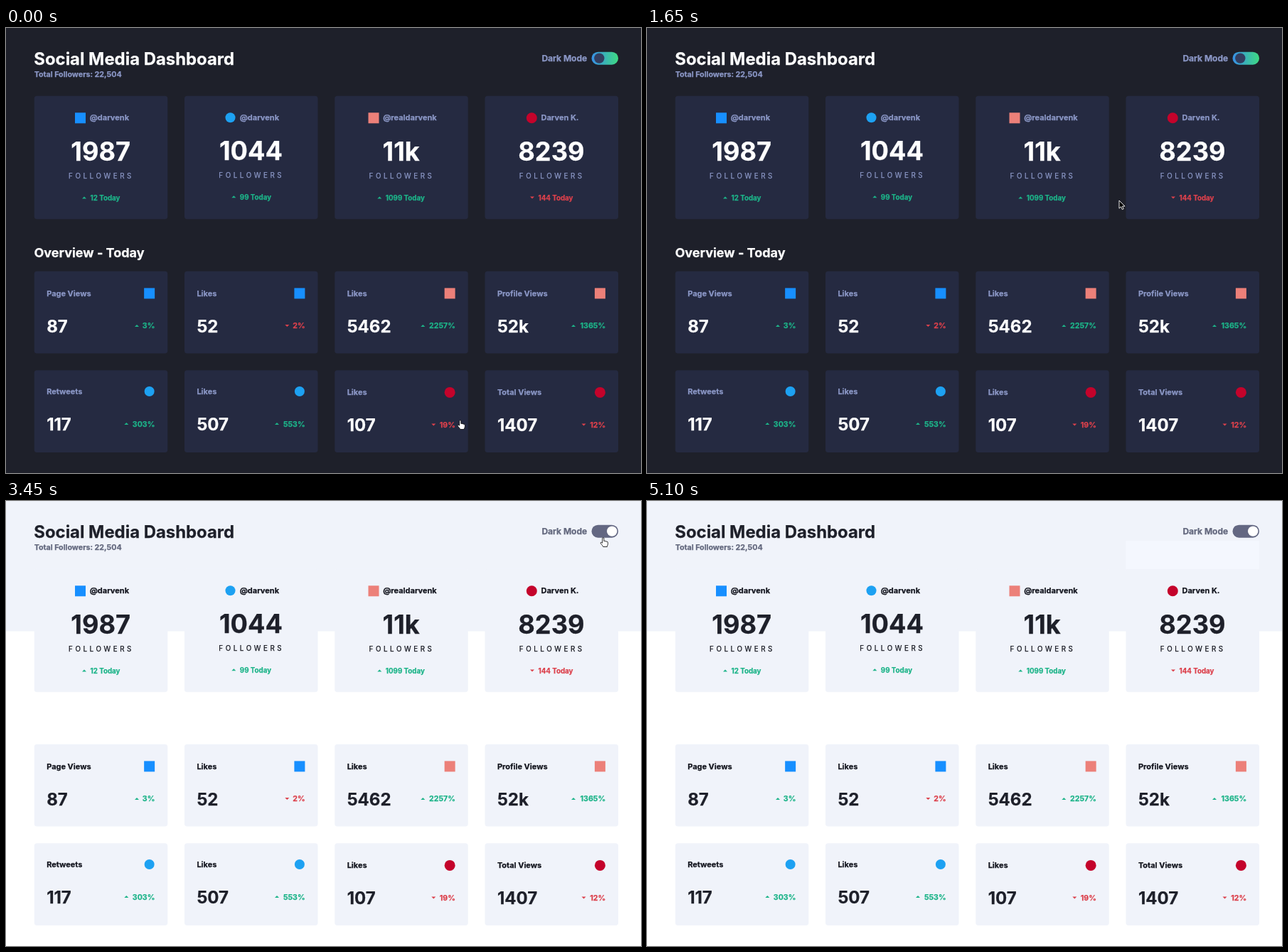
Write an HTML page that moves like this. It is 893 by 627 pixels and loops after 7.04 s.

```html
<!DOCTYPE html>
<html lang="en">
<head>
<meta charset="utf-8">
<title>Social Media Dashboard</title>
<style>
  html, body { margin: 0; width: 100%; height: 100%; overflow: hidden; }
  svg {
    --bg: #1e202a; --band: #1e202a; --card: #252a41; --ink: #fff;
    --muted: #8b97c6; --label: #8b97c6; --track: url(#track); --knob: #333d5f;
    display: block; width: 893px; height: 627px; background: var(--bg);
    font: 700 11px Inter, sans-serif; font-optical-sizing: none;
  }
  svg.light {
    --bg: #fff; --band: #f0f3fa; --card: #f0f3fa; --ink: #1e202a;
    --muted: #63687e; --label: #14161f; --track: #636782; --knob: #fff;
  }
  /* A hairline stroke gives the slightly heavier smoothed lettering. */
  text { fill: currentColor; stroke: currentColor; stroke-width: .25px; }
  .band { fill: var(--band); }
  .card { fill: var(--card); }
  .ink { color: var(--ink); }
  .muted { color: var(--muted); }
  .label { color: var(--label); }
  .up { color: #1db489; }
  .down { color: #dc414c; }
  .title { font-size: 23.9px; }
  .count { font-size: 24px; }
  .heading { font-size: 18px; color: #fff; }
  .total { font-size: 10.7px; }
  .mode { font-size: 12px; }
  .big { font-size: 36.2px; text-anchor: middle; }
  .caption { font-size: 9.75px; font-weight: 400; letter-spacing: 3.6px; }
  .today { font-size: 9.75px; }
  .percent { font-size: 10.6px; text-anchor: end; }
</style>
</head>
<body>
<svg id="stage" viewBox="0 0 893 627">
  <defs>
    <linearGradient id="track">
      <stop stop-color="#378fe6"/><stop offset="1" stop-color="#3eda82"/>
    </linearGradient>
  </defs>
  <rect class="band" width="893" height="183.5"/>
  <rect id="patch" x="673.5" y="56" width="187.5" height="40" fill="#f4f7fe"/>
  <text class="title ink" x="39.3" y="52">Social Media Dashboard</text>
  <text class="total muted" x="39.7" y="68.6">Total Followers: 22,504</text>
  <text class="mode muted" x="753.4" y="47">Dark Mode</text>
  <rect x="823.5" y="33.7" width="37.5" height="18" rx="9" style="fill:var(--track)"/>
  <circle id="knob" cy="42.6" r="7.2" style="fill:var(--knob)"/>
  <text class="heading" x="39.5" y="323">Overview - Today</text>
  <g id="cards"></g>
  <g id="cursor">
    <path id="arrow" d="M0 0V11.2l2.6-2.4 1.7 3.9 1.9-.8-1.7-3.8h3.5Z" fill="#000" stroke="#fff" stroke-width=".9"/>
    <path id="hand" d="M-1.3 7V.8a1.1 1.1 0 0 1 2.2 0V4.5q1.2-.8 2 .3q1.2-.5 1.9.5q1.6-.3 1.6 1.2V8.5q0 1.5-1 2.8V12.5H-.2Q-1 10.5-3.3 8.3q-1.4-1.6-.2-2q1-.3 2.2.9Z" fill="#fff" stroke="#000" stroke-width=".8"/>
  </g>
</svg>
<script>
const LOOP = 7040, STEP = 150;
const $ = id => document.getElementById(id);
const columnX = column => 39.75 + 211.25 * column;
const cards = [];

const text = (cls, x, y, value) => `<text class="${cls}" x="${x}" y="${y}">${value}</text>`;

const badges = {
  blue: (x, y) => `<rect x="${x - 7.5}" y="${y - 7.5}" width="15" height="15" fill="#178fff"/>`,
  sky: (x, y) => `<circle cx="${x}" cy="${y}" r="7" fill="#1da1f2"/>`,
  coral: (x, y) => `<rect x="${x - 7.5}" y="${y - 7.5}" width="15" height="15" fill="#ec8079"/>`,
  red: (x, y) => `<circle cx="${x}" cy="${y}" r="7.5" fill="#c4032b"/>`
};

function trendArrow(trend, x, y) {
  const flip = trend === "up" ? 1 : -1;
  return `<path class="${trend}" fill="currentColor" d="M${x - 3} ${y + 1.5 * flip}h6l-3 ${-3 * flip}z"/>`;
}

function addCard(column, y, height, content) {
  const x = columnX(column);
  const node = document.createElementNS("http://www.w3.org/2000/svg", "g");
  node.innerHTML = `<rect class="card" x="${x}" y="${y}" width="187.5" height="${height}" rx="3.75"/>` + content;
  $("cards").append(node);
  cards.push({ node, x, y, height });
}

// badge, badge x, handle, followers, trend, arrow x, change today
[
  ["blue", 104.5, "@darvenk", "1987", "up", 110, "12"],
  ["sky", 315.5, "@darvenk", "1044", "up", 320.3, "99"],
  ["coral", 517, "@realdarvenk", "11k", "up", 525.3, "1099"],
  ["red", 739.3, "Darven K.", "8239", "down", 740, "144"]
].forEach(([badge, badgeX, handle, count, trend, arrowX, change], column) => {
  const lift = column === 1 ? 1.2 : 0;
  const x = columnX(column);
  addCard(column, 95.7, 173.6,
    badges[badge](badgeX, 126.8 - lift / 2) +
    text("label", badgeX + 13.2, 130.3 - lift / 2, handle) +
    text("big ink", x + 93.4, 187 - lift, count) +
    text("caption label", x + 48.3, 212.3 - lift, "FOLLOWERS") +
    trendArrow(trend, arrowX, 239 - lift) +
    text("today " + trend, arrowX + 8.5, 242.8 - lift, change + " Today"));
});

// label, badge, count, trend, arrow x, percent
[
  ["Page Views", "blue", "87", "up", 184, "3%"],
  ["Likes", "blue", "52", "down", 395.3, "2%"],
  ["Likes", "coral", "5462", "up", 586.3, "2257%"],
  ["Profile Views", "coral", "52k", "up", 798, "1365%"],
  ["Retweets", "sky", "117", "up", 169.3, "303%"],
  ["Likes", "sky", "507", "up", 381, "553%"],
  ["Likes", "red", "107", "down", 601.3, "19%"],
  ["Total Views", "red", "1407", "down", 812.5, "12%"]
].forEach(([label, badge, count, trend, arrowX, percent], i) => {
  const column = i % 4, x = columnX(column);
  const y = i < 4 ? 342.8 : 482.3;
  const shift = badge === "sky" ? -1.4 : 0;
  addCard(column, y, 115.6,
    badges[badge](x + 161.9, y + 31.1 + shift) +
    text("label", x + 17.4, y + 34.8 + shift / 2, label) +
    text("count ink", x + 17.4, y + 85.9 + shift, count) +
    trendArrow(trend, arrowX, y + 76.7 + shift) +
    text("percent " + trend, x + 169.7, y + 80.6 + shift, percent));
});

// Pointer tip, one position per step; it rests on the switch for a while.
const onSwitch = [841, 47.3];
const track = [
  [639, 553], [620, 552], [545, 547], [434, 539], [407, 534], [394, 510], [400, 454], [425, 415],
  [455, 380], [530, 345], [610, 300], [664, 243], [715, 190], [770, 130], [825, 58],
  ...Array(8).fill(onSwitch),
  [840, 52], [832, 66], [780, 115], [645, 165], [611, 202], [596, 255],
  [592, 312], [635, 346], [700, 390], [745, 436], [775, 475]
];

const cardAt = point => point && cards.find(c =>
  point[0] > c.x && point[0] < c.x + 187.5 && point[1] > c.y && point[1] < c.y + c.height);
const hoveredAt = step => step > 0 ? cardAt(track[step]) : undefined;
const overSwitch = ([x, y]) => x > 823 && y < 53;

function render() {
  const step = Math.floor(performance.now() % LOOP / STEP);
  const light = step >= 17;
  $("stage").classList.toggle("light", light);
  $("patch").style.display = step >= 25 ? "" : "none";
  $("knob").setAttribute("cx", step < 18 ? 834.3 : step === 18 ? 844 : 852.2);

  // Hover takes two steps to fade fully in or out.
  const now = hoveredAt(step), before = hoveredAt(step - 1);
  for (const card of cards) {
    const level = ((card === now) + (card === before)) / 2;
    card.node.style.filter = level ? `brightness(${1 + (light ? -0.3 : 0.3) * level})` : "";
  }

  const point = track[step];
  $("cursor").style.display = point ? "" : "none";
  if (point) {
    const hand = cardAt(point) || overSwitch(point);
    $("cursor").setAttribute("transform", `translate(${point})`);
    $("hand").style.display = hand ? "" : "none";
    $("arrow").style.display = hand ? "none" : "";
  }
  requestAnimationFrame(render);
}
render();
</script>
</body>
</html>
```
